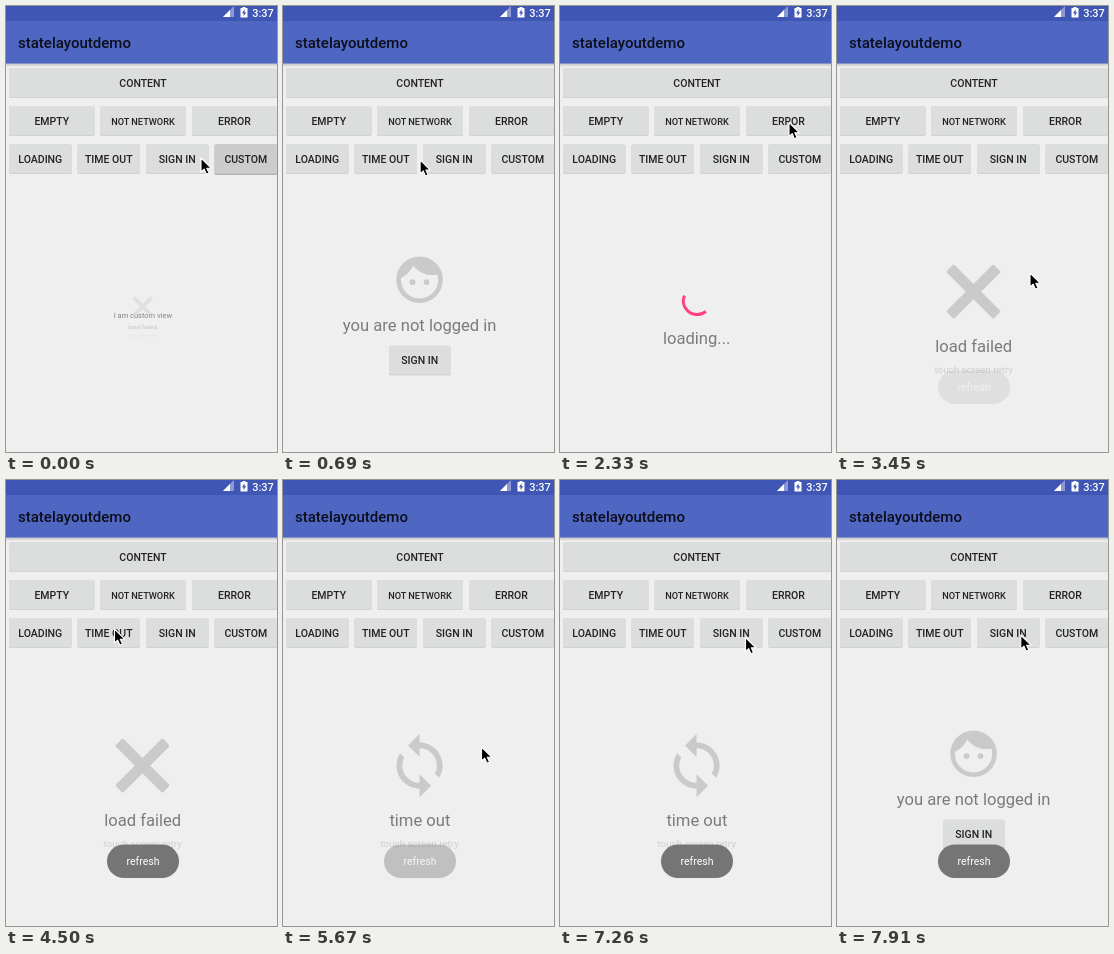
Animation of 271x446 px, one loop 8 s. Source, as an HTML page:

```html
<!DOCTYPE html>
<html lang="en">
<head>
<meta charset="utf-8">
<title>statelayoutdemo</title>
<style>
  html, body { margin: 0; width: 100%; height: 100%; overflow: hidden; background: #efefef; }
  svg { display: block; width: 271px; height: 446px; }
  text { font-family: Roboto, sans-serif; text-anchor: middle; }
  .label { font-size: 10.5px; font-weight: 500; fill: #222; }
  .title { font-size: 16.6px; fill: #7b7b7b; }
  .retry { font-size: 9.8px; fill: #cfcfcf; }
  .icon { fill: #cacaca; }
</style>
</head>
<body>
<svg viewBox="0 0 271 446">
  <defs>
    <linearGradient id="shade" x2="0" y2="1">
      <stop stop-color="#000" stop-opacity=".22"/>
      <stop offset="1" stop-color="#000" stop-opacity="0"/>
    </linearGradient>
  </defs>
  <rect width="271" height="446" fill="#efefef"/>
  <rect y="57" width="271" height="4" fill="url(#shade)"/>
  <rect width="271" height="57.5" fill="#4f67c3"/>
  <rect width="271" height="15" fill="#4056b4"/>
  <text x="12" y="42" font-size="15" font-weight="500" fill="#0c0e1a" style="text-anchor:start">statelayoutdemo</text>
  <path d="M217 11L228 0V11Z" fill="#fff" opacity=".4"/>
  <path d="M217 11L224 4V11Z" fill="#fff"/>
  <path d="M234.5 2H236.5V1H239.5V2H241.5V11.5H234.5Z" fill="#fff"/>
  <path d="M238.6 3.2L236 7.3H237.6V10.2L240.2 6.2H238.6Z" fill="#4056b4"/>
  <text x="257" y="11" font-size="11" font-weight="500" fill="#fff">3:37</text>

  <g id="buttons"></g>

  <g id="custom"><text x="137" y="313.7" font-size="12" fill="#444">I am custom view</text></g>

  <g id="login">
    <g class="icon" transform="translate(108.6 245.8) scale(2.33)">
      <path fill-rule="evenodd" d="M12 2A10 10 0 1 0 12 22A10 10 0 1 0 12 2ZM12 20C7.59 20 4 16.41 4 12C4 11.71 4.02 11.42 4.05 11.14C6.41 10.09 8.28 8.16 9.26 5.77C11.07 8.33 14.05 10 17.42 10C18.2 10 18.95 9.91 19.67 9.74C19.88 10.45 20 11.21 20 12C20 16.41 16.41 20 12 20Z"/>
      <circle cx="9" cy="13" r="1.25"/>
      <circle cx="15" cy="13" r="1.25"/>
    </g>
    <text class="title" x="136.7" y="325">you are not logged in</text>
  </g>

  <g id="timeout">
    <path class="icon" transform="translate(102 251) scale(2.88)" d="M12 4V1L8 5l4 4V6c3.31 0 6 2.69 6 6 0 1.01-.25 1.97-.7 2.8l1.46 1.46C19.54 15.03 20 13.57 20 12c0-4.42-3.58-8-8-8zm0 14c-3.31 0-6-2.69-6-6 0-1.01.25-1.97.7-2.8L5.24 7.74C4.46 8.97 4 10.43 4 12c0 4.42 3.58 8 8 8v3l4-4-4-4v3z"/>
    <text class="title" x="136.9" y="345.6">time out</text>
    <text class="retry" x="136.7" y="367">touch screen retry</text>
  </g>

  <g id="loading">
    <circle id="spinner" cx="137" cy="295" r="13.6" fill="none" stroke="#ff4081" stroke-width="3"/>
    <text class="title" x="136.7" y="338">loading...</text>
  </g>

  <g id="failed">
    <g class="icon" transform="translate(136.5 285.6)">
      <rect x="-33.4" y="-5.4" width="66.8" height="10.8" rx="1.6" transform="rotate(45)"/>
      <rect x="-33.4" y="-5.4" width="66.8" height="10.8" rx="1.6" transform="rotate(-45)"/>
    </g>
    <text class="title" x="136.7" y="345.6">load failed</text>
    <text class="retry" x="136.7" y="367">touch screen retry</text>
  </g>

  <g id="toast">
    <rect x="101" y="364.5" width="72" height="33.5" rx="16.75" fill="#757575"/>
    <text x="137" y="385" font-size="10.5" fill="#fff">refresh</text>
  </g>

  <path id="cursor" d="M0 0V14L3.2 11.1L5.4 16.2L8 15.1L5.8 10.2H10.2Z" fill="#000" stroke="#fff" stroke-width="1.1" stroke-linejoin="round"/>
</svg>
<script>
const LOOP = 8000, SWITCH = 210, FADE = 500;
const $ = id => document.getElementById(id);
const clamp = v => Math.max(0, Math.min(1, v));
const ramp = (t, start, length) => clamp((t - start) / length);

function makeButton(parent, label, x, y, width, size = 10.5) {
  const g = document.createElementNS('http://www.w3.org/2000/svg', 'g');
  const box = `x="${x}" width="${width}" height="29" rx="1.5"`;
  g.innerHTML = `
    <rect class="press" ${box} y="${y + 2}" opacity="0" fill="#b4b4b4"/>
    <rect ${box} y="${y + 0.8}" fill="#c6c8c7"/>
    <rect ${box} y="${y}" fill="#dcdedd"/>
    <rect class="press" ${box} y="${y}" opacity="0" fill="#cdcccd"/>
    <text class="label" x="${x + width / 2}" y="${y + 18.7}" style="font-size:${size}px">${label}</text>`;
  parent.append(g);
  return g.querySelectorAll('.press');
}

const bar = $('buttons');
makeButton(bar, 'CONTENT', 3, 62, 268);
makeButton(bar, 'EMPTY', 3, 100, 85.5);
makeButton(bar, 'NOT NETWORK', 94, 100, 86, 9.2);
makeButton($('login'), 'SIGN IN', 106, 339.5, 61.5);
const presses = {
  failed: makeButton(bar, 'ERROR', 186, 100, 85),
  loading: makeButton(bar, 'LOADING', 3, 138, 62.5),
  timeout: makeButton(bar, 'TIME OUT', 71.5, 138, 62.5),
  login: makeButton(bar, 'SIGN IN', 140, 138, 62.5),
  custom: makeButton(bar, 'CUSTOM', 208.5, 138, 62.5)
};

// [start of the switch, view shown]
const switches = [
  [-2000, 'failed'], [-130, 'custom'], [300, 'login'], [1010, 'timeout'],
  [1560, 'loading'], [2540, 'failed'], [4820, 'timeout'], [7660, 'login']
];

// [time, x, y]
const pointer = [
  [0, 195, 152], [60, 195, 152.5], [220, 183, 155], [540, 183, 155], [810, 105, 153],
  [1110, 105, 153], [1340, 31.5, 156.5], [1750, 31.5, 156.5], [2270, 229, 116.5],
  [2740, 229, 116], [3150, 193, 267], [3620, 193, 267], [4210, 147, 159.5],
  [4500, 108.5, 149], [5210, 108.5, 149], [5670, 198.5, 267], [5850, 203, 269],
  [6420, 203, 269], [7030, 190, 167.5], [7260, 185.5, 157.5], [7380, 183.8, 155], [LOOP, 183.8, 155]
];

function pointerAt(t) {
  const i = pointer.findIndex(p => p[0] > t);
  const [t0, x0, y0] = pointer[i - 1], [t1, x1, y1] = pointer[i];
  const p = (t - t0) / (t1 - t0), e = p * p * (3 - 2 * p);
  return [x0 + (x1 - x0) * e, y0 + (y1 - y0) * e];
}

function showView(id, amount) {
  const view = $(id);
  view.setAttribute('opacity', amount);
  view.setAttribute('transform', `translate(136.7 309.6) scale(${amount}) translate(-136.7 -309.6)`);
}

function toastAlpha(t) {
  const enter = start => 1 - (1 - ramp(t, start, FADE)) ** 2;
  const leave = start => 1 - ramp(t, start, FADE) ** 2;
  return t < 6000 ? enter(3420) * leave(5276) : enter(6230);
}

function spin(t) {
  const turn = t / 1333, length = 12 + 48 * (0.5 - 0.5 * Math.cos(turn * 2 * Math.PI));
  $('spinner').setAttribute('stroke-dasharray', `${length} 200`);
  $('spinner').setAttribute('transform', `rotate(${turn * 440 % 360} 137 295)`);
}

function draw() {
  const t = performance.now() % LOOP;
  const current = switches.findLastIndex(s => s[0] <= t);
  const [start, next] = switches[current];
  const progress = ramp(t, start, SWITCH);
  for (const id in presses) {
    const pressed = Math.max(...switches.filter(s => s[1] === id)
      .map(([s]) => ramp(t, s - 50, 30) * (1 - ramp(t, s + 140, 90))));
    presses[id].forEach(r => r.setAttribute('opacity', pressed));
    showView(id, 0);
  }
  if (current > 0) showView(switches[current - 1][1], 1 - progress);
  showView(next, progress);
  spin(t);
  $('toast').setAttribute('opacity', toastAlpha(t));
  $('cursor').setAttribute('transform', `translate(${pointerAt(t)})`);
  requestAnimationFrame(draw);
}
draw();
</script>
</body>
</html>
```
